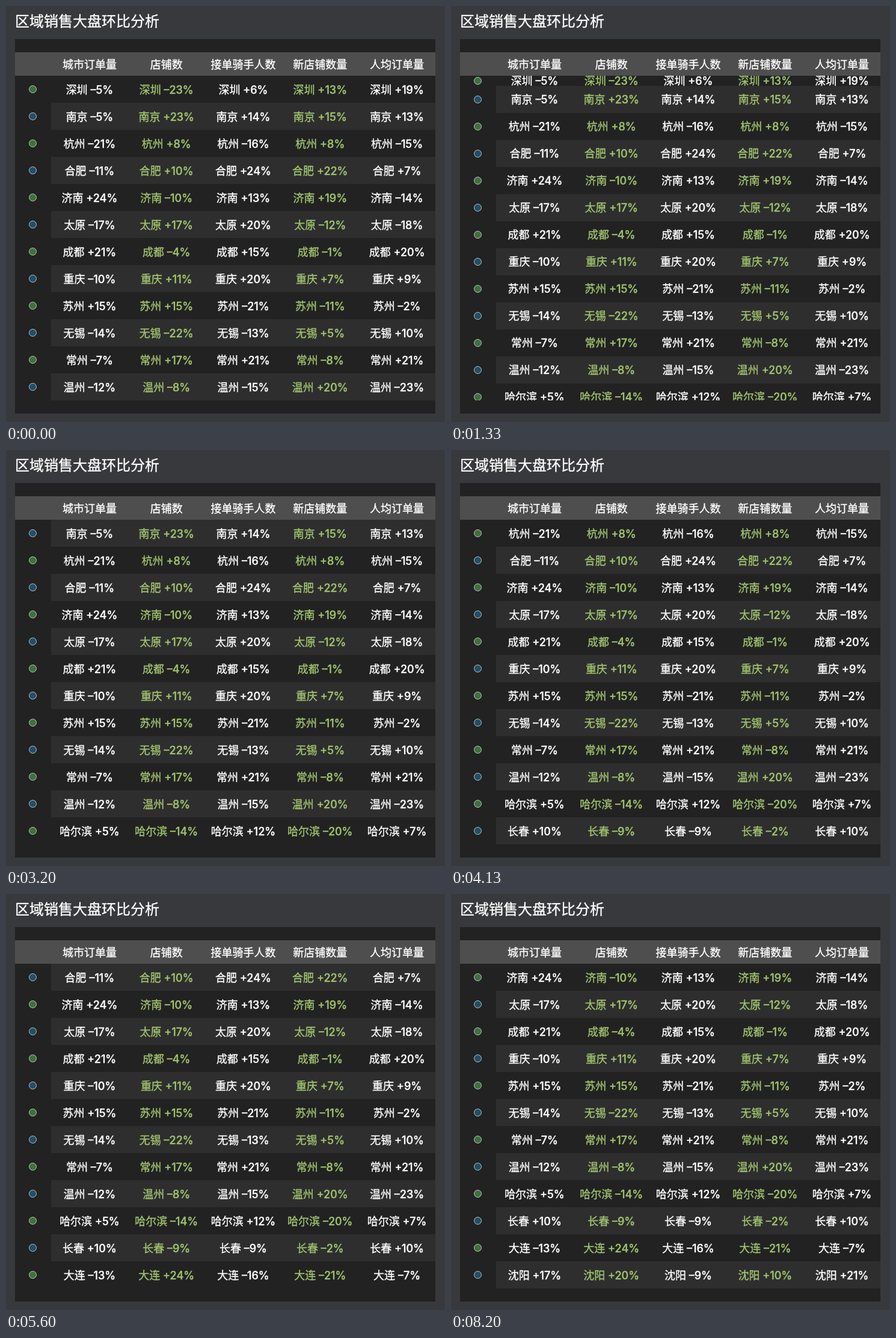
Recreate the animation shown at these times as an HTML page. Size 730 by 692 pixels, loop 8.27 s.

```html
<!DOCTYPE html>
<html lang="zh-CN">
<head>
<meta charset="utf-8">
<title>区域销售大盘环比分析</title>
<style>
  html, body { margin: 0; width: 100%; height: 100%; overflow: hidden; }
  body {
    position: relative;
    background: #38393d;
    color: #fff;
    font: 500 18px/26px Inter, "Noto Sans CJK SC", "Noto Sans CJK", sans-serif;
    -webkit-text-stroke: 0.35px currentColor;
  }
  h1 {
    position: absolute; left: 15px; top: 8px; margin: 0;
    font-size: 24px; font-weight: 500; line-height: 36px; white-space: nowrap;
  }
  .board { position: absolute; left: 15px; top: 55px; width: 699px; height: 623px; background: #222; }
  .head, .row { display: flex; overflow: hidden; white-space: nowrap; }
  .head { position: absolute; top: 22px; width: 699px; height: 39px; background: #4e4e4e; }
  .rows { position: absolute; top: 61px; width: 699px; height: 540px; overflow: hidden; }
  .row { height: 45px; }
  .mark, .cell { display: flex; align-items: center; justify-content: center; }
  .mark { flex: 0 0 59px; margin-right: 1px; }
  .cell { flex: 0 0 127.8px; }
  .cell span { position: relative; top: 1px; }
  .row .cell:nth-child(odd) { color: #a2c46f; }
  .row:nth-child(even) .cell { background: #2e2e2e; }
  .dot {
    flex: none; box-sizing: border-box; width: 13px; height: 13px; border-radius: 50%;
    border: 1px solid #b9cdb7; background: #3f7040;
  }
  .row:nth-child(even) .dot { border-color: #b4c8d1; background: #234f66; }
</style>
</head>
<body>
<h1>区域销售大盘环比分析</h1>
<div class="board">
  <div class="head"></div>
  <div class="rows"></div>
</div>
<script>
  const titles = ['城市订单量', '店铺数', '接单骑手人数', '新店铺数量', '人均订单量'];
  const data = {
    深圳: [-5, -23, 6, 13, 19],
    南京: [-5, 23, 14, 15, 13],
    杭州: [-21, 8, -16, 8, -15],
    合肥: [-11, 10, 24, 22, 7],
    济南: [24, -10, 13, 19, -14],
    太原: [-17, 17, 20, -12, -18],
    成都: [21, -4, 15, -1, 20],
    重庆: [-10, 11, 20, 7, 9],
    苏州: [15, 15, -21, -11, -2],
    无锡: [-14, -22, -13, 5, 10],
    常州: [-7, 17, 21, -8, 21],
    温州: [-12, -8, -15, 20, -23],
    哈尔滨: [5, -14, 12, -20, 7],
    长春: [10, -9, -9, -2, 10],
    大连: [-13, 24, -16, -21, -7],
    沈阳: [17, 20, -9, 10, 21]
  };

  const LOOP = 8270, TICK = 1000 / 15;
  const FIRST = 1225, PERIOD = 2014.3, SLIDE = 300, STEPS = 4, ROW = 45;

  const cell = text => `<div class="cell"><span>${text}</span></div>`;
  const signed = n => (n < 0 ? '\u2013' : '+') + Math.abs(n) + '%';

  document.querySelector('.head').innerHTML = '<div class="mark"></div>' + titles.map(cell).join('');
  const box = document.querySelector('.rows');
  box.innerHTML = Object.entries(data).map(([city, values]) =>
    '<div class="row"><div class="mark"><div class="dot"></div></div>' +
    values.map(n => cell(`${city} ${signed(n)}`)).join('') + '</div>'
  ).join('');
  const rows = [...box.children];

  // The standard "ease" curve, cubic-bezier(.25, .1, .25, 1)
  function ease(x) {
    if (x <= 0) return 0;
    if (x >= 1) return 1;
    let lo = 0, hi = 1, s;
    for (let i = 0; i < 24; i++) {
      s = (lo + hi) / 2;
      if (0.75 * s * (1 - s) + s ** 3 < x) lo = s; else hi = s;
    }
    return 0.3 * s * (1 - s) ** 2 + 3 * s * s * (1 - s) + s ** 3;
  }

  // Each step folds the top row away, in time held to 15 ticks a second
  function draw(ms) {
    const t = Math.floor((ms % LOOP + 4) / TICK) * TICK;
    for (let k = 0; k < STEPS; k++) {
      rows[k].style.height = ROW * (1 - ease((t - FIRST - k * PERIOD) / SLIDE)) + 'px';
    }
  }

  const start = performance.now();
  function frame() {
    draw(performance.now() - start);
    requestAnimationFrame(frame);
  }
  draw(0);
  requestAnimationFrame(frame);
</script>
</body>
</html>
```
